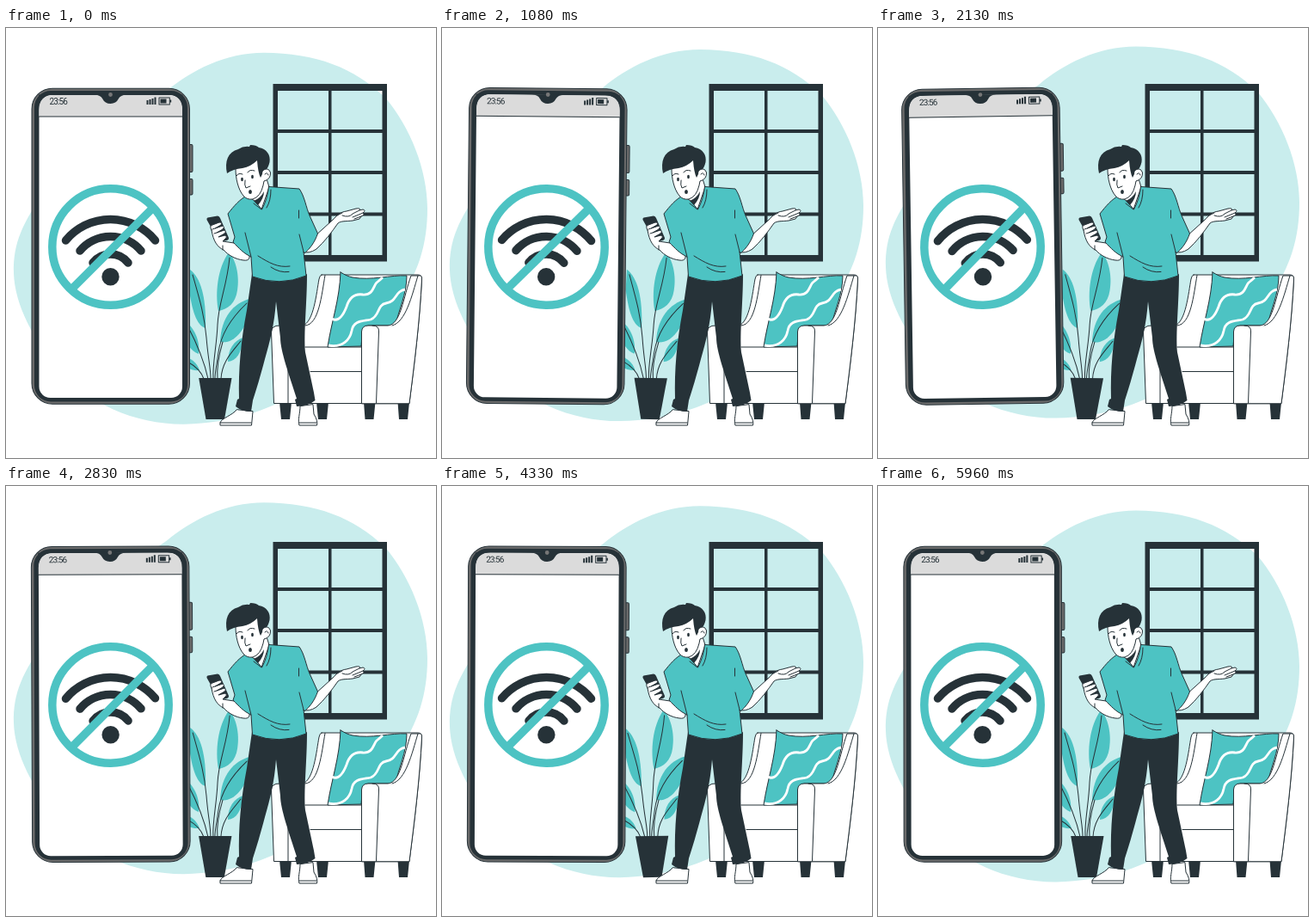
An HTML page that plays this animation: 500x500 px, repeating every 6 s.

```html
<!DOCTYPE html>
<html lang="en">
<head>
<meta charset="utf-8">
<title>No connection</title>
<style>
  html, body { margin: 0; width: 100%; height: 100%; overflow: hidden; background: #fff; }
  svg { display: block; width: 100%; height: 100%; }
  .teal { fill: #4dc3c3; }
  .dark { fill: #263238; }
  .ink { stroke: #263238; stroke-width: 1; stroke-linecap: round; stroke-linejoin: round; }
  .white { fill: #fff; }
  .line { fill: none; }
  .clock { font: 10px Roboto, "Liberation Sans", sans-serif; font-stretch: condensed; letter-spacing: -.9px; }
</style>
</head>
<body>
<svg viewBox="0 0 500 500">
  <path id="blob" fill="#c9eded" d="M300 28.700C255 28.700 216 49 187 73C135 108 75 150 45 191C20 225 8 250 9 285C10 322 33 364 60 395C95 437 150 461 207 460.700C265 459 300 445 340 425C400 395 430 370 455 320C480 285 490 250 490 210C490 165 470 115 441 81C405 46 360 29 300 28.700Z"/>

  <g id="window" class="dark">
    <path fill-rule="evenodd" d="M310.500 65H443V271.500H310.500ZM316 73V264H437.500V73Z"/>
    <path d="M375 70h3.500v197h-3.500ZM314 118h126v4H314ZM314 166h126v4H314ZM314 214.500h126v4H314Z"/>
  </g>

  <g id="plant">
    <g class="teal">
      <path d="M259 261C267 268 272 288 269 305C267 320 258 327 247 329C243 308 246 279 259 261Z"/>
      <path d="M214 281C226 290 233 312 232 349C221 346 216 326 213 305Z"/>
      <path d="M283 315C265 320 250 336 249 365C265 368 276 352 283 335Z"/>
      <path d="M208 341C219 348 226 364 224 379C215 376 209 366 206 355Z"/>
      <path d="M276 360C265 363 258 374 258 388C268 387 274 378 276 360Z"/>
      <path d="M205 382C215 383 222 389 225 398C216 399 210 395 205 390Z"/>
    </g>
    <path class="ink line" stroke-width="1.300" d="M260 267C257 300 247 320 246 345S240 390 241 408M217 287C225 315 231 335 233 360S238 395 238 408M280 320C262 337 250 355 247 377S243 400 243 408M211 346C222 367 230 385 235 408M273 364C262 378 251 388 250 408M211 388C220 393 227 399 230 408M252 365C247 382 245 397 246 408"/>
    <path class="dark" d="M224.200 407H262.500L254 455H232.500Z"/>
  </g>

  <g id="chair">
    <path class="dark" d="M318 435h14l-2 20h-10ZM361 435h14l-2 20h-10ZM416 435h13.500l-2 20h-10ZM455.500 435h13.500l-2 20h-10Z"/>
    <g class="ink white">
      <path d="M367 287H479Q484 287 483.500 292C481 342 475 389 469 436.500H311.500L308.500 353Q309 346 318 346H345C358 342 361 308 364 292Q365 287 367 287Z"/>
      <path class="line" d="M371 287.500C367 310 364 345 348 346M348 371H414M354 399.500H414M328 354V436"/>
    </g>
    <path class="teal ink" d="M389 284C394 287 398 289 403 290C425 294 447 287 466 288C466 310 456 329 453 346H421Q414 347 413 370L374 371C378 343 388 316 389 284Z"/>
    <g class="line" stroke="#fff" stroke-width="2.800">
      <path d="M379 338C387 343 393 332 396 324C400 311 408 309 415 310C427 311 427 300 431 296Q435 293 438 290"/>
      <path d="M375 369C392 372 400 362 402 352C404 340 414 341 424 339C435 335 431 322 442 320C455 318 452 306 464 304"/>
    </g>
    <g class="ink white">
      <path d="M413.500 436.500V353Q414 346 421 346H444C459 345 462 313 471 288H479Q484 287 483.500 292C481 342 475 389 469 436.500Z"/>
      <path class="line" d="M426 346Q434 346 433.500 353L430.500 436M479 288C472 311 465 342 449 346"/>
    </g>
  </g>

  <g id="man">
    <g class="ink white">
      <path d="M268 444C264 450 250 454 249 459V462H285.500L287 446Z"/>
      <path d="M342 440C342 448 339 456 341 462H361.500Q363 457 358 449L357 438Z"/>
      <path class="line" d="M249 459H285M341 459H361"/>
    </g>
    <path class="dark" d="M286 286C300 296 335 296 350 286C350 320 346 355 348 377L358 424L359.500 433Q351 440 338 440L336 432L338 431C329 402 319 376 319 360L314 318C312 345 307 364 301 385C296 404 291 421 287 433L285 446Q274 446 267 440L269 432L271 431C270 398 273 364 280 328Z"/>

    <path class="ink white" d="M358 243L379 224C385 218 388 214 396 213L407 210Q413 209 411 212L415 211Q419 212 415 215Q418 217 413 219L411 222L403 224C395 225 390 224 386 227C379 237 370 249 361 257Q352 263 345 260Z"/>
    <path class="ink line" d="M391 218Q399 221 403 216L411 212M403 220L415 215M405 222L413 219M385 218L391 215"/>

    <path class="dark" d="M234.500 220.500L246 218.500Q248 218.500 249 221L259 244Q259.500 246 257 247L248 249L233.500 223Q233 221 234.500 220.500Z"/>
    <path class="ink white" d="M239 235Q236 230 240 229L248 226Q252 226 250 229L243 233L252 230Q255 231 252 234L245 238L254 235Q257 237 254 239L247 243L255 241Q258 243 255 245L252 248L265 250L283 257V267Q282 271 276 270C267 269 258 264 253 258C246 255 241 248 239 235Z"/>
    <path class="ink line" d="M252 258V253M240 234L243 233M242 239L245 238"/>

    <path class="ink white" d="M276 193L289 204L297 211L306 185L302 172Z"/>
    <path class="teal ink" d="M305.500 184.500L341 187C347 195 349 209 353 218L362.500 239C359 249 354 256 347 262L346 260L349 288Q318 301 286.500 289L285 266C276 262 271 256 264 249L266 243L258 216C265 207 272 199 280 195L289 201L297.500 211Q304 199 305.500 184.500Z"/>
    <path class="ink line" d="M340.500 212V221M341 240L346 260M278 238L285 266M293 265C306 273 316 279 330 277M308 278Q318 285 329 283.500M308 188Q308 201 303 209M288 204L297 211"/>
    <path class="dark" d="M288 201Q296 198 300 190Q300 198 293 206Z"/>

    <path class="ink white" d="M267 164C267 175 270 188 276 195Q280 200 287 199Q296 196 299 183L300 178Q308 176 307.500 168Q305 161 298 166L292 152Z"/>
    <path class="dark" d="M257 169C254 155 258 144 270 141Q276 137 283 138L284 136Q291 136 294 139C303 140 308 148 306.500 156Q305 162 303 164Q298 164 298 170L296 174Q293 168 292 154Q285 161 275 163Q264 164 257 169Z"/>
    <path class="ink line" d="M268 172Q270 168 275 170M281 168Q283 164 289 166M278 177Q277 183 279 186L284 184M301 170Q304 167 305 171"/>
    <g class="dark">
      <ellipse cx="274.500" cy="176" rx="1.400" ry="2.200"/>
      <ellipse cx="286.500" cy="173" rx="1.400" ry="2.200"/>
      <ellipse cx="284" cy="190.500" rx="1.900" ry="2.500"/>
    </g>
  </g>

  <g id="phone">
    <path class="ink" fill="#6b6b6b" d="M212 135.500h3.500q1.500 0 1.500 1.500v29q0 1.500-1.500 1.500h-3.500ZM212 175.500h3.500q1.500 0 1.500 1.500v15.500q0 1.500-1.500 1.500h-3.500Z"/>
    <rect class="ink" x="30" y="70.200" width="183.500" height="367" rx="24" fill="#6b6b6b"/>
    <rect class="dark" x="33" y="73" width="178" height="361.500" rx="19"/>
    <rect class="white" x="38.500" y="78" width="166.500" height="352" rx="13"/>
    <path class="dark" d="M38 77.500H56Q39 78 38.500 96ZM205.500 77.500H188Q204.500 78 205 96Z"/>
    <path fill="#dbdbdb" d="M38.500 103V95Q38.500 78 55.500 78H188Q205 78 205 95V103Z"/>
    <path class="ink line" d="M38.500 103H205"/>
    <path class="dark" d="M103 77.500Q110 78 112 82Q115 88 121.500 88T131 82Q133 78 140 77.500Z"/>
    <circle cx="121.500" cy="77.500" r="2.400" fill="#777"/>
    <text class="clock dark" x="50.500" y="89">23:56</text>
    <path class="dark" d="M163.500 84h2v5h-2ZM166.500 83h2v6h-2ZM169.500 82h2v7h-2ZM172.500 80.500h2v8.500h-2ZM179.500 82.500h7v5h-7ZM190.500 83.500h1.700v3h-1.700Z"/>
    <rect class="ink line" x="178" y="81" width="12.300" height="8"/>

    <g class="line" stroke="#263238" stroke-width="9.500" stroke-linecap="round">
      <path d="M69.500 247A67.500 67.500 0 0 1 173.500 247"/>
      <path d="M86 259A46.500 46.500 0 0 1 157 259"/>
      <path d="M101 273A26 26 0 0 1 142 273"/>
    </g>
    <circle class="dark" cx="121.500" cy="289.300" r="10.200"/>
    <g class="line" stroke="#4dc3c3" stroke-width="9.500">
      <circle cx="121.500" cy="254.500" r="67.700"/>
      <path d="M75.500 304.500L171.500 208.500"/>
    </g>
  </g>
</svg>
<script>
  const LOOP = 6000, PHONE_PERIOD = 3000;
  const [blob, plant, phone] = ["blob", "plant", "phone"].map(id => document.getElementById(id));

  // Triangle wave: 0, 1, 0, -1, 0 over one period.
  function sway(time, period) {
    const phase = (time / period + 0.25) % 1;
    return 1 - 4 * Math.abs(phase - 0.5);
  }

  function render(time) {
    const lift = 10 * (1 - Math.abs(1 - 2 * time / LOOP));
    blob.setAttribute("transform", `translate(0 ${-lift})`);
    plant.setAttribute("transform", `rotate(${sway(time, LOOP)} 243 358)`);
    phone.setAttribute("transform", `rotate(${sway(time, PHONE_PERIOD)} 122 254)`);
  }

  const start = performance.now();
  function tick() {
    render((performance.now() - start) % LOOP);
    requestAnimationFrame(tick);
  }
  render(0);
  requestAnimationFrame(tick);
</script>
</body>
</html>
```
